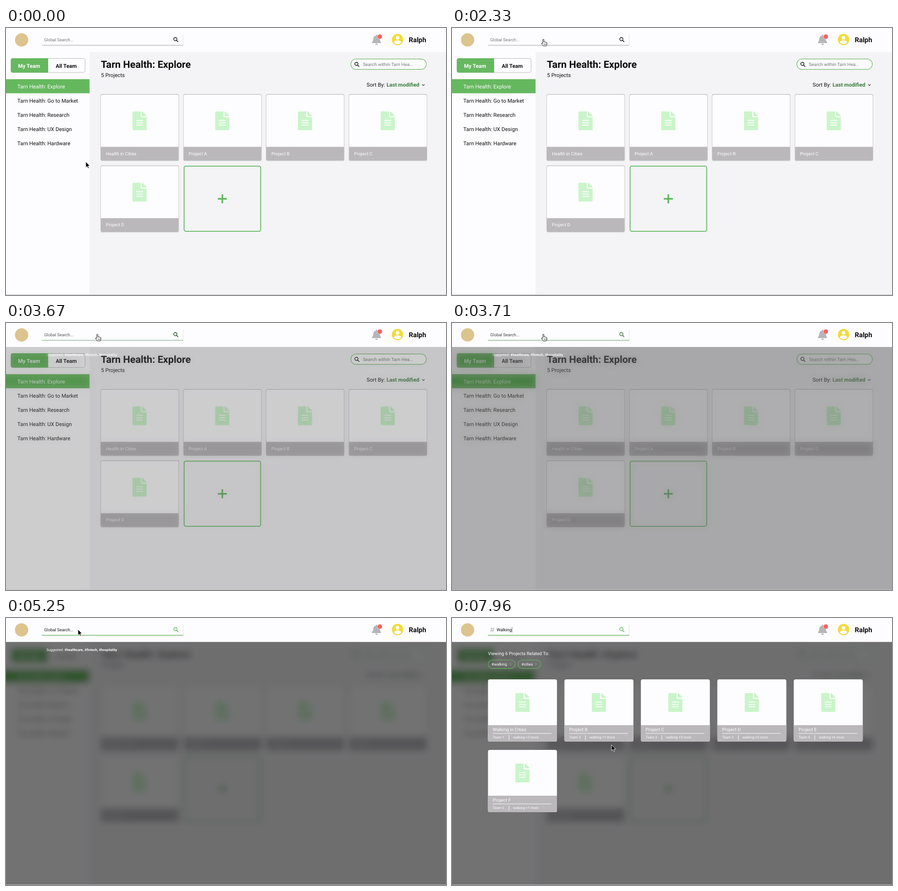
Write an HTML page that moves like this. It is 960 px wide and 583 px high and loops after 8 s.

```html
<!DOCTYPE html>
<html lang="en">
<head>
<meta charset="utf-8">
<title>Project search</title>
<style>
  html, body { margin: 0; width: 100%; height: 100%; overflow: hidden; background: #fdfcfe; }
  svg { display: block; width: 960px; height: 583px; }
  text { font-family: Roboto, Arial, sans-serif; text-rendering: geometricPrecision; white-space: pre; }
</style>
</head>
<body>
<svg id="stage" viewBox="0 0 960 583"></svg>
<script>
const GREEN = '#66b85f', GRAY = '#bab8bb', PAPER = '#fdfcfe';
const LOOP = 8000;

const text = (x, y, size, fill, str, weight = 400) =>
  `<text x="${x}" y="${y}" font-size="${size}" fill="${fill}" font-weight="${weight}">${str}</text>`;
const rect = (x, y, w, h, fill, r = 0, extra = '') =>
  `<rect x="${x}" y="${y}" width="${w}" height="${h}" rx="${r}" fill="${fill}" ${extra}/>`;
const line = (d, color, width, extra = '') =>
  `<path d="${d}" fill="none" stroke="${color}" stroke-width="${width}" ${extra}/>`;
const lens = (x, y, color, extra = '') =>
  `<g ${extra}><circle cx="${x - 1}" cy="${y - 1}" r="3.5" fill="none" stroke="${color}" stroke-width="1.4"/>` +
  line(`M${x + 1.7} ${y + 1.7}l3 3`, color, 1.7, 'stroke-linecap="round"') + '</g>';
const doc = (x, y) =>
  `<g transform="translate(${x} ${y}) scale(.08)"><path fill="#c9f5c9" d="M224 136V0H24Q0 0 0 24V488Q0 512 24 512H360
  Q384 512 384 488V160H248Q224 160 224 136zM384 122V128H256V0H262Q272 0 279 7L377 105Q384 112 384 122z"/>` +
  [232, 296, 360].map(v => rect(96, v, 192, 24, PAPER, 12)).join('') + '</g>';
// White sheet with a gray strip along the bottom
const sheet = (x, y, w, h, strip, r) =>
  rect(x, y, w, h, PAPER, r) +
  `<path fill="${GRAY}" d="M${x} ${y + strip}h${w}V${y + h - r}q0 ${r} ${-r} ${r}H${x + r}q${-r} 0 ${-r} ${-r}z"/>`;

function projectCard(name, i) {
  const x = 207 + i % 4 * 180.5, y = 145 + (i > 3) * 155.7;
  return `<g>` + rect(x - .6, y - .7, 170.7, 145.8, '#aaa8ab', 4, 'opacity=".75"') +
    rect(x - 1, y, 171.5, 146, '#aaa8ab', 4, 'opacity=".22"') +
    sheet(x, y + .6, 169.5, 144, 114, 3.5) + doc(x + 69, y + 37.3) +
    text(x + 11, y + 132.6, 9.9, PAPER, name) + '</g>';
}

function resultCard([name, team, more], i) {
  const x = 78.5 + i % 5 * 166.8, y = 134 + (i > 4) * 154;
  return sheet(x, y, 150.5, 136, 100, 4) + doc(x + 59.8, y + 30) +
    text(x + 10.5, y + 113, 9.95, PAPER, name) +
    line(`M${x + 10.5} ${y + 118}h128`, PAPER, 1) +
    text(x + 10.5, y + 129.4, 7.5, PAPER, 'Team ' + team) +
    line(`M${x + 45.8} ${y + 122}v10`, PAPER, 1) +
    text(x + 54.8, y + 129.4, 7.55, PAPER, `walking +${more} more`);
}

const tag = (x, w, name) =>
  rect(x, 91.7, w, 18.4, 'none', 9.2, `stroke="${GREEN}" stroke-width="1.1"`) +
  text(x + 7.5, 104, 8.4, PAPER, name) +
  line(`M${x + w - 13} 98l6 6m0-6l-6 6`, '#7f9a7f', .9);

const teams = ['Explore', 'Go to Market', 'Research', 'UX Design', 'Hardware'];
const projects = ['Health in Cities', 'Project A', 'Project B', 'Project C', 'Project D'];
const results = [['Walking in Cities', 1, 2], ['Project B', 2, 1], ['Project C', 3, 5],
  ['Project D', 3, 2], ['Project E', 5, 6], ['Project F', 5, 1]];

const page =
  rect(-40, -40, 1040, 663, '#f4f3f6') + rect(-40, -40, 222.3, 663, PAPER) +
  rect(11, 66.5, 161.5, 30.5, PAPER, 3.5, 'stroke="#b9b7ba"') +
  `<path fill="${GREEN}" d="M92 66v31.5H14.5q-4 0-4-4V70q0-4 4-4z"/>` +
  text(26.3, 86.8, 11.7, PAPER, 'My Team', 700) + text(108.4, 86.8, 11.7, '#111', 'All Team', 700) +
  rect(-40, 111.7, 222.3, 30.8, GREEN) +
  teams.map((t, i) => text(24.8, 131.5 + i * 31, 11.65, i ? '#111' : PAPER, 'Tarn Health: ' + t)).join('') +
  text(207, 86.5, 21.6, '#0c0c0c', 'Tarn Health: Explore', 700) +
  text(207.3, 107.3, 11.6, '#111', '5 Projects') +
  rect(752.5, 67.6, 164.5, 22.8, PAPER, 11.4, `stroke="${GREEN}" stroke-width="1.2"`) +
  lens(765.5, 79.3, '#111') + text(778.7, 83, 9.95, '#777', 'Search within Tarn Hea...') +
  text(786.8, 128.3, 11.65, '#111', 'Sort By:') + text(830.2, 128.3, 11.65, '#3c803d', 'Last modified', 700) +
  line('M908 123l2.6 2.6 2.6-2.6', '#333', 1.1) +
  projects.map(projectCard).join('') +
  rect(388.6, 301.6, 167, 142.2, 'none', 3.5, `stroke="#5cb85a" stroke-width="1.8"`) +
  line('M472 364.5v17m-8.500-8.500h17', '#5cb85a', 3.4, 'stroke-linecap="round"');

const header =
  rect(0, 0, 960, 52.3, PAPER) +
  '<circle cx="34" cy="26" r="14.500" fill="#dcc48f"/>' +
  line('M386.500 14v23', '#e4e3e6', 1) +
  line('M78.500 37.700h308', '#9a999c', 1.1) +
  line('M78.500 37.700h308', GREEN, 1.3, 'class="veil"') +
  `<g id="hint">${text(83.2, 28.8, 9.2, '#757477', 'Global Search...')}
   <g class="veil">${text(83.2, 28.8, 9.2, '#555', 'Global Search...')}</g></g>` +
  `<g class="found">${line('M86.500 20.500l-1.500 10m5.500-10l-1.500 10m-5-6.800h8.500m-9.300 3.600h8.500', '#999', .8)}` +
  text(97.3, 29, 9.4, '#111', 'Walking') + line('M131 19.500v12', '#333', .7) + '</g>' +
  lens(370.5, 25.3, '#111') +
  `<g class="veil">${rect(362, 17, 17, 17, PAPER)}${lens(370.5, 25.3, GREEN)}</g>` +
  `<path fill="#b6b5b8" d="M808.500 14.500q1.400 0 1.400 1.400v.9q5.300 1 5.600 7 .2 4.400 2.300 6.400 1.300 1.600 0 2.700H799
   q-1.300-1.100 0-2.700 2.200-2 2.300-6.400 .4-6 5.800-7v-.9q0-1.400 1.400-1.400zM805.700 34.300h5.600q-.3 2.800-2.800 2.800t-2.800-2.800z"/>` +
  '<circle cx="815.600" cy="18.800" r="5.300" fill="#fa625e" stroke="#fdfcfe" stroke-width=".6"/>' +
  `<circle cx="854.300" cy="25.200" r="12.400" fill="#f0dc3c"/><circle cx="854.300" cy="21.500" r="3.900" fill="${PAPER}"/>
   <path fill="${PAPER}" d="M846.500 31.700q0-4.700 7.800-4.700t7.800 4.700q-3 3.600-7.800 3.600t-7.800-3.600z"/>` +
  text(878.8, 30.5, 14.8, '#0c0c0c', 'Ralph', 700);

const stage = document.getElementById('stage');
stage.innerHTML = `
  <defs><filter id="blur" filterUnits="userSpaceOnUse" x="-40" y="-40" width="1040" height="663">
    <feGaussianBlur stdDeviation="7.500"/></filter></defs>
  <g id="page">${page}</g>
  <g class="veil"><use href="#page" filter="url(#blur)"/>${rect(0, 0, 960, 583, '#000', 0, 'opacity=".545"')}
    <g id="tips">${text(88.2, 71.6, 7.5, PAPER, 'Suggested:')}
    ${text(127.8, 71.6, 7.45, PAPER, '#healthcare, #fintech, #hospitality', 700)}</g></g>
  <g class="found">${text(78.5, 80.5, 9.95, PAPER, 'Viewing 6 Projects Related To:')}
    ${tag(78.8, 59, '#walking')}${tag(144, 49.5, '#cities')}${results.map(resultCard).join('')}</g>
  ${header}
  ${rect(0, 582, 960, 1, '#bdbcbf')}
  <g id="cursor" stroke-linejoin="round">
    <path id="arrow" d="M0 0V12.600L2.900 9.900L4.900 14.500L7 13.600L5.100 9.100H9z" fill="#000" stroke="#fff" stroke-width=".9"/>
    <g id="hand"><path d="M-1.500 9V1.200a1.300 1.300 0 0 1 2.600 0V6q1.300-1 2.300.3q1.200-.7 2.100.5q2-.4 2 1.500V11q0 2-1.300 3.600H-.4
      Q-2 12-4 9.600q-.7-1.700.9-1.500z" fill="#fff" stroke="#111" stroke-width="1"/>
      ${line('M1.400 9.500v3m2-3v3m2-3v3', '#111', .7)}</g>
  </g>`;

const $ = id => document.getElementById(id);
const fade = (cls, v) => stage.querySelectorAll('.' + cls).forEach(e => e.setAttribute('opacity', v));
const ease = (t, from, to) => {
  const x = Math.min(1, Math.max(0, (t - from) / (to - from)));
  return x * x * (3 - 2 * x);
};

// Pointer path: time, x, y
const path = [[0, 174, 292], [350, 172, 305], [850, 177, 264], [1330, 205.5, 31], [1670, 199.5, 24.5],
  [4130, 199.5, 24.5], [4800, 157, 25], [5820, 157, 25], [5960, 150, 104], [6830, 150, 104],
  [7540, 398, 204], [7670, 398, 204], [7850, 378, 284], [7960, 348, 277], [LOOP, 348, 277]];

function pointer(t) {
  const i = path.findIndex(k => k[0] > t), a = path[i - 1], b = path[i];
  const k = (t - a[0]) / (b[0] - a[0]);
  return [a[1] + (b[1] - a[1]) * k, a[2] + (b[2] - a[2]) * k];
}

let lastVeil, lastFound;
function draw() {
  const t = performance.now() % LOOP;
  const veil = ease(t, 3570, 3830), found = ease(t, 5255, 5390);
  if (veil !== lastVeil) fade('veil', lastVeil = veil);
  if (found !== lastFound) {
    fade('found', lastFound = found);
    $('tips').setAttribute('opacity', 1 - found);
    $('hint').setAttribute('opacity', 1 - found);
  }
  const [x, y] = pointer(t), pointing = y < 39 && t < 3900;
  $('cursor').setAttribute('transform', `translate(${x} ${y})`);
  $('hand').style.display = pointing ? '' : 'none';
  $('arrow').style.display = pointing ? 'none' : '';
  requestAnimationFrame(draw);
}
draw();
</script>
</body>
</html>
```
